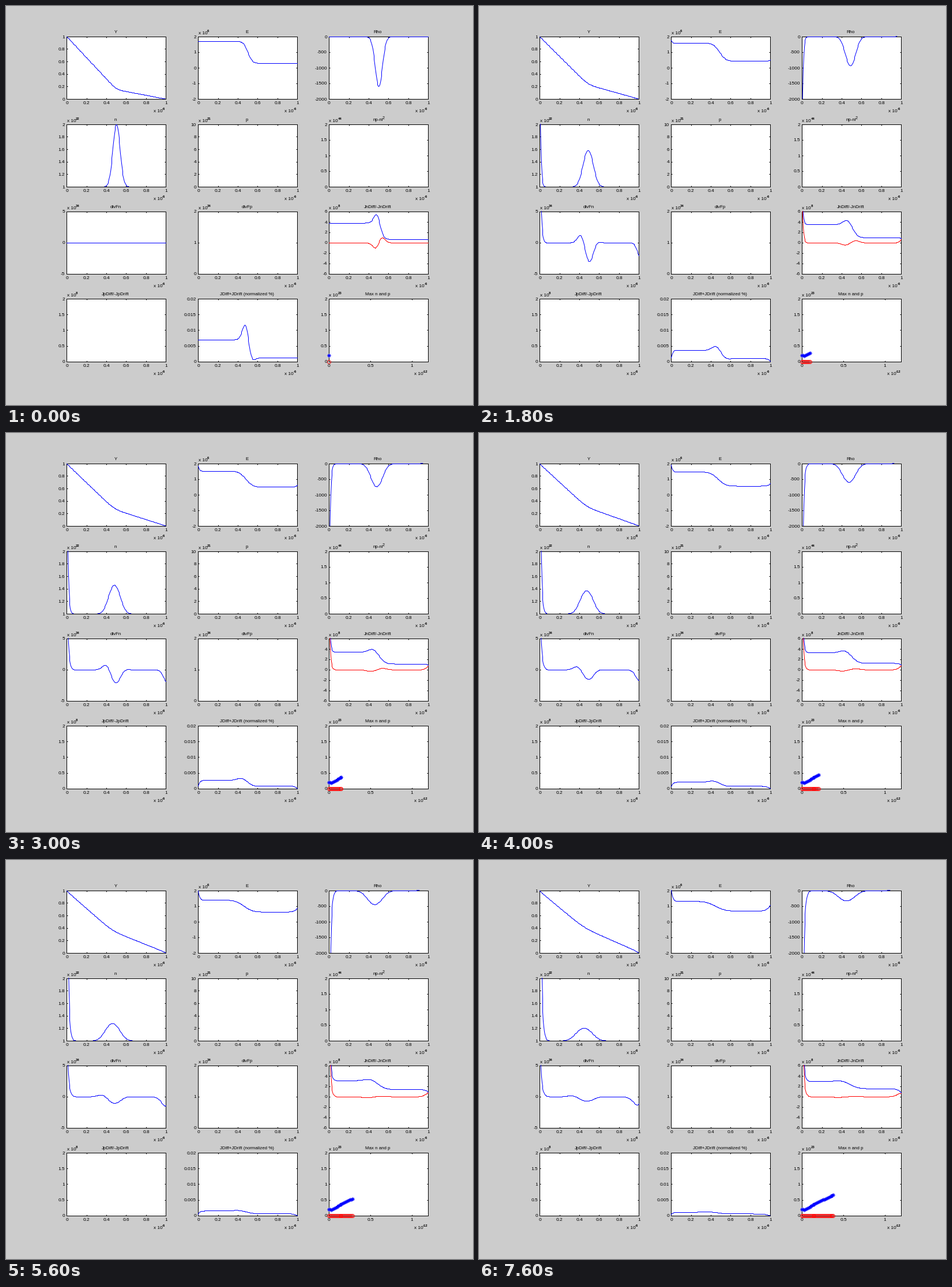
Recreate the animation shown at these times as a matplotlib script. Size 810 by 691 pixels, loop 8 s.

```python
import numpy as np
import matplotlib.pyplot as plt
from matplotlib.animation import FuncAnimation
from matplotlib.transforms import Bbox, TransformedBbox

W, H, DPI = 810, 691, 64
PT = 72 / DPI  # one pixel in points
BLUE, RED = "#0000ff", "#ff0000"

# Drift-diffusion model of an electron cloud between two blocking contacts
Q, EPS, MU, D = 1.602e-19, 1.036e-10, 0.14, 0.14 * 0.0259
N0, CELLS, LENGTH = 1e22, 200, 1e-6
STEP, SUB, STATES = 1.35e-14, 20, 29
h = LENGTH / CELLS
nodes = np.linspace(0, 1, CELLS + 1)
mids = np.linspace(0, 1, CELLS)


def field(n):
    e = np.append(0, np.cumsum(Q * (N0 - n[1:-1])) * h / EPS)
    return e + (1 - e.sum() * h) / LENGTH


def currents(n):
    drift = Q * MU * (n[1:] + n[:-1]) / 2 * field(n)
    return drift, -Q * D * np.diff(n) / h


def rate(n):
    drift, diff = currents(n)
    flux = np.concatenate([[0], (drift - diff) / Q, [0]])
    return np.diff(flux) / h


def simulate():
    n = N0 * (1 + np.exp(-((nodes - 0.5) / 0.036) ** 2 / 2))
    states = [(n, np.zeros_like(n))]
    for _ in range(STATES - 1):
        for _ in range(SUB):
            r = rate(n)
            n = n + r * STEP / SUB
        states.append((n, r))
    return states


states = simulate()
peaks = np.array([n.max() for n, _ in states]) / 1e23
times = np.arange(STATES) * STEP / 1e-12

plt.rcParams.update({"font.family": "Liberation Sans", "path.simplify": False})
fig = plt.figure(figsize=(W / DPI, H / DPI), dpi=DPI, facecolor="#cccccc")


def text(x, y, s, size=8.2, **kw):
    fig.text(x / W, 1 - y / H, s, fontsize=size * PT, va="baseline", **kw)


def power(x, y, exp, ha="left"):
    """Axis multiplier, anchored at its left or right end."""
    if ha == "right":
        x -= 15.5 + (7 if len(exp) == 2 else 10)
    text(x, y, "x 10")
    text(x + 15.5, y - 4, exp, 6, weight="bold")


def panel(i, title, lo, hi, tick, exp="", xmax=1, xtick=0.2, xexp="-6"):
    left = (105, 333, 560)[i % 3]
    top = (52, 204, 355, 506)[i // 3]
    bottom = (160, 312, 463, 615)[i // 3]
    wide, tall = 172, bottom - top
    # the small offset keeps edges from snapping to a neighbouring pixel
    ax = fig.add_axes([(left + 0.2) / W, (H - 1 - bottom + 0.2) / H,
                       wide / W, tall / H])
    ax.set(xlim=(0, xmax), ylim=(lo, hi))
    xs = np.arange(0, xmax + 1e-9, xtick)
    ys = np.arange(lo, hi + tick / 2, tick)
    ax.set_xticks(xs)
    ax.set_yticks(ys)
    ax.tick_params(direction="in", top=True, right=True, length=2.2 * PT,
                   width=PT, labelbottom=False, labelleft=False)
    for s in ax.spines.values():
        s.set_linewidth(PT)
    for v in xs:
        text(left + 0.5 + wide * v / xmax, bottom + 10, f"{v:g}", ha="center")
    for v in ys:
        v = round(v, 6) + 0.0
        text(left - 3, bottom - tall * (v - lo) / (hi - lo) + 3.5,
             f"{v:g}", ha="right")
    text(left + wide / 2 - 1, top - 5, title, 7.9, ha="center")
    if exp:
        power(left + 0.5, top - 3, exp)
    power(left + wide + 1, bottom + 24, xexp, "right")
    return ax


def line(ax, x, y=None, color=BLUE):
    y = np.zeros_like(x) if y is None else y
    ln, = ax.plot(x, y, color=color, lw=PT, snap=True, zorder=3)
    edge = Bbox([[-0.003, -0.0046], [1.003, 1.0046]])
    ln.set_clip_box(TransformedBbox(edge, ax.transAxes))
    return ln


def marks(ax, marker, color):
    ln, = ax.plot([], [], ls="", marker=marker, ms=6 * PT, mfc="none",
                  mec=color, mew=0.9 * PT, clip_on=False, zorder=4)
    return ln


volt = line(panel(0, "Y", 0, 1, 0.2), nodes)
efield = line(panel(1, "E", -2, 2, 1, "6"), mids)
rho = line(panel(2, "Rho", -2000, 0, 500), nodes)
dens = line(panel(3, "n", 1, 2, 0.2, "22"), nodes)
line(panel(4, "p", 0, 10, 2, "21"), nodes)
line(panel(5, "np-ni", 0, 2, 0.5, "44"), nodes)
text(652.5, 195.5, "2", 7)
div = line(panel(6, "divFn", -5, 5, 5, "34"), nodes)
line(panel(7, "divFp", 0, 2, 1, "34"), nodes)
ax_j = panel(8, "JnDiff/-JnDrift", -6, 6, 2, "8")
j_drift, j_diff = line(ax_j, mids), line(ax_j, mids, color=RED)
line(panel(9, "JpDiff/-JpDrift", 0, 2, 0.5, "8"), nodes)
total = line(panel(10, "JDiff+JDrift (normalized %)", 0, 0.02, 0.005), mids)
ax_max = panel(11, "Max n and p", 0, 2, 0.5, "23", 1.2, 0.5, "-12")
max_n, max_p = marks(ax_max, (8, 2, 0), BLUE), marks(ax_max, "o", RED)

# 200 ms ticks on which the picture rests
RESTS = (1, 7, 10, 12, 17, 23, 27, 29, 32, 35, 39)


def draw(i):
    k = i - sum(r <= i for r in RESTS)
    n, r = states[k]
    e = field(n)
    drift, diff = currents(n)
    excess = np.abs(n / N0 - 1)
    volt.set_ydata(1 - np.append(0, np.cumsum(e)) * h)
    efield.set_ydata(e / 1e6)
    rho.set_ydata(Q * (N0 - n))
    # the axis shows through the faint tails
    faint = (excess > 1e-14) & (excess < 1e-3)
    dens.set_ydata(np.where(faint, np.nan, n / 1e22))
    div.set_ydata(r / 1e34)
    j_drift.set_ydata(drift / 1e8)
    j_diff.set_ydata(diff / 1e8)
    total.set_ydata(np.abs(drift - diff) / drift.max() / 100)
    max_n.set_data(times[:k + 1], peaks[:k + 1])
    max_p.set_data(times[:k + 1], np.zeros(k + 1))
    return []


anim = FuncAnimation(fig, draw, frames=40, interval=200, init_func=lambda: draw(0),
                     repeat=True, repeat_delay=0, cache_frame_data=False)
plt.show()
```
